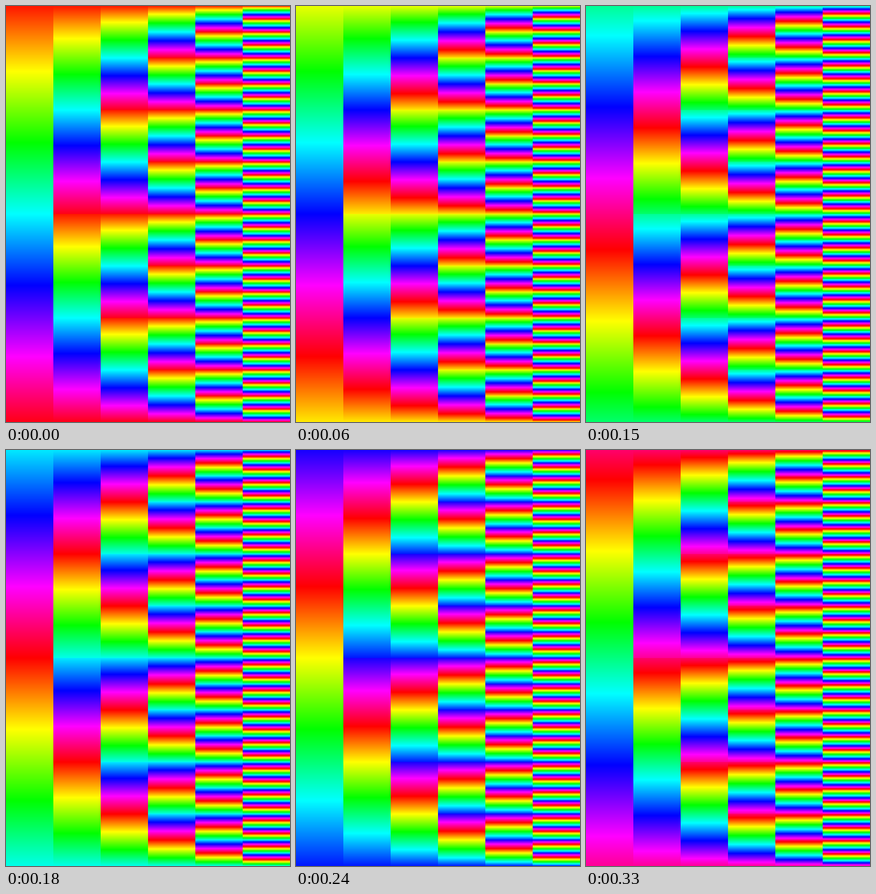
Recreate the animation shown at these times as an HTML page with a canvas. Size 480 by 700 pixels, loop 0.36 s.

```html
<!DOCTYPE html>
<html lang="en">
<head>
<meta charset="utf-8">
<title>Rainbow columns</title>
<style>
  html, body { margin: 0; width: 100%; height: 100%; overflow: hidden; }
  canvas { display: block; }
</style>
</head>
<body>
<canvas id="stage" width="480" height="700"></canvas>
<script>
const canvas = document.getElementById("stage");
const ctx = canvas.getContext("2d");
const COLUMNS = 6;
const STEPS = 12;
const STEP_MS = 30;
const HUE_SPAN = 350; // each band stops just short of a full turn
const columnWidth = canvas.width / COLUMNS;
let shownStep = -1;

function draw(startHue) {
  for (let column = 0; column < COLUMNS; column++) {
    const bands = 2 ** column;
    for (let y = 0; y < canvas.height; y++) {
      const phase = ((y + 0.5) * bands / canvas.height) % 1;
      const hue = startHue + 180 + (phase - 0.5) * HUE_SPAN;
      ctx.fillStyle = `hsl(${hue % 360}, 100%, 50%)`;
      ctx.fillRect(column * columnWidth, y, columnWidth, 1);
    }
  }
}

function tick() {
  const step = Math.floor(performance.now() / STEP_MS) % STEPS;
  if (step !== shownStep) {
    draw(step * 360 / STEPS);
    shownStep = step;
  }
  requestAnimationFrame(tick);
}

tick();
</script>
</body>
</html>
```
